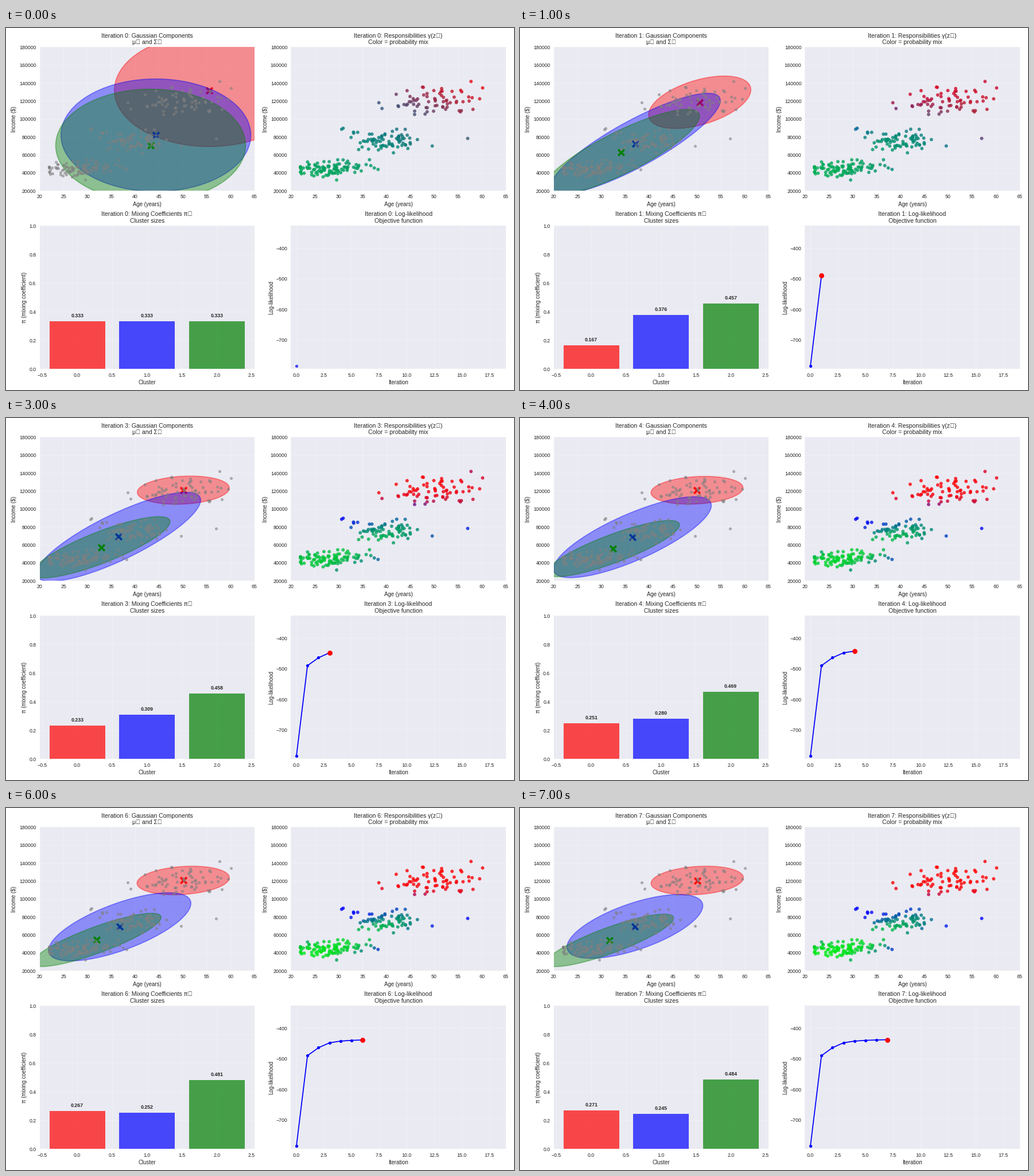
Recreate the animation shown at these times as a matplotlib script. Size 885 px wide and 632 px high, loop 8 s.

```python
import numpy as np
import matplotlib.pyplot as plt
from matplotlib.animation import FuncAnimation
from matplotlib.patches import Polygon

W, H, DPI = 885, 632, 63.2
STEPS = 8
COLORS = ["red", "blue", "green"]

plt.style.use("seaborn-v0_8")
plt.rcParams["font.family"] = ["Liberation Sans"]


# --- data: three customer segments (age, income) ---
def segment(z, mean, cov):
    (var_age, cross), (_, var_inc) = cov
    sd = np.sqrt(var_inc)
    slope = cross / sd
    age = mean[0] + slope * z[:, 0] + np.sqrt(var_age - slope**2) * z[:, 1]
    return np.column_stack([age, mean[1] + sd * z[:, 0]])


noise = np.random.RandomState(42).standard_normal((250, 2))
data = np.vstack([
    segment(noise[:100], (28, 45000), ((15, 3000), (3000, 2.5e7))),
    segment(noise[100:180], (40, 75000), ((20, -2000), (-2000, 4e7))),
    segment(noise[180:], (50, 120000), ((25, 5000), (5000, 5e7))),
])
data[:, 0] = np.clip(data[:, 0], 22, 65)
center, scale = data.mean(axis=0), data.std(axis=0)
points = (data - center) / scale


# --- expectation maximisation on standardised data ---
def e_step(pi, mu, cov):
    dens = np.empty((len(points), 3))
    for k in range(3):
        d = points - mu[k]
        dist = np.sum(d @ np.linalg.inv(cov[k]) * d, axis=1)
        norm = 2 * np.pi * np.sqrt(np.linalg.det(cov[k]))
        dens[:, k] = pi[k] * np.exp(-dist / 2) / norm
    total = dens.sum(axis=1, keepdims=True)
    return dens / total, np.log(total).sum()


def m_step(resp):
    mass = resp.sum(axis=0)
    mu = resp.T @ points / mass[:, None]
    cov = []
    for k in range(3):
        d = points - mu[k]
        cov.append((resp[:, k, None] * d).T @ d / mass[k] + 1e-6 * np.eye(2))
    return mass / len(points), mu, np.array(cov)


def run_em():
    state = np.full(3, 1 / 3), points[[244, 101, 114]], np.array([np.eye(2)] * 3)
    history = []
    for _ in range(STEPS):
        resp, loglik = e_step(*state)
        history.append((*state, resp, loglik))
        state = m_step(resp)
    return history


history = run_em()
logliks = [h[-1] for h in history]

# --- stage ---
fig = plt.figure(figsize=((W + 0.01) / DPI, (H + 0.01) / DPI), dpi=DPI)


def panel(left, top):
    return fig.add_axes([left / W, 1 - (top + 250.5) / H, 374.3 / W, 250.5 / H])


ax_comp, ax_resp = panel(58.5, 33.5), panel(496.4, 33.5)
ax_mix, ax_ll = panel(58.5, 345), panel(496.4, 345)

angle = np.linspace(0, 2 * np.pi, 200)
circle = np.column_stack([np.cos(angle), np.sin(angle)])


def reset(ax, title, xlabel, ylabel, xlim, ylim):
    ax.clear()
    ax.set(title=title, xlabel=xlabel, ylabel=ylabel, xlim=xlim, ylim=ylim)
    ax.grid(True, alpha=0.3)


def reset_customers(ax, title):
    reset(ax, title, "Age (years)", "Income ($)", (20, 65), (20000, 180000))
    ax.set_xticks(range(20, 66, 5))
    ax.set_yticks(range(20000, 180001, 20000))


def draw_components(ax, mu, cov):
    for k, color in enumerate(COLORS):
        ring = mu[k] + 2 * circle @ np.linalg.cholesky(cov[k]).T
        ax.add_patch(Polygon(center + scale * ring, facecolor=color,
                             edgecolor=color, alpha=0.4, linewidth=2))
        ax.scatter(*(center + scale * mu[k]), c=color, marker="x", s=150,
                   linewidths=4)
    ax.scatter(*data.T, c="gray", s=30, alpha=0.6)


def draw_mixing(ax, pi):
    ax.bar(range(3), pi, color=COLORS, alpha=0.7)
    for k, p in enumerate(pi):
        ax.text(k, p + 0.02, f"{p:.3f}", ha="center", va="bottom",
                fontsize=10, fontweight="bold")


def draw_loglik(ax, i):
    if i == 0:
        ax.plot(0, logliks[0], "o", color="blue", markersize=6, alpha=0.7)
        return
    ax.plot(range(i + 1), logliks[:i + 1], "o-", color="blue", linewidth=2,
            markersize=6)
    ax.plot(i, logliks[i], "o", color="red", markersize=10)


def draw(i):
    pi, mu, cov, resp, _ = history[i]
    head = f"Iteration {i}: "

    reset_customers(ax_comp, head + "Gaussian Components\nμₖ and Σₖ")
    draw_components(ax_comp, mu, cov)

    reset_customers(ax_resp,
                    head + "Responsibilities γ(zₙ)\nColor = probability mix")
    ax_resp.scatter(*data.T, c=np.clip(resp[:, [0, 2, 1]], 0, 1), s=40, alpha=0.8)

    reset(ax_mix, head + "Mixing Coefficients πₖ\nCluster sizes", "Cluster",
          "π (mixing coefficient)", (-0.54, 2.54), (0, 1))
    draw_mixing(ax_mix, pi)

    reset(ax_ll, head + "Log-likelihood\nObjective function", "Iteration",
          "Log-likelihood", (-0.5, 19), (-796, -326))
    draw_loglik(ax_ll, i)
    return []


anim = FuncAnimation(fig, draw, frames=STEPS, init_func=lambda: [],
                     interval=1000, repeat=True, repeat_delay=0)
plt.show()
```
